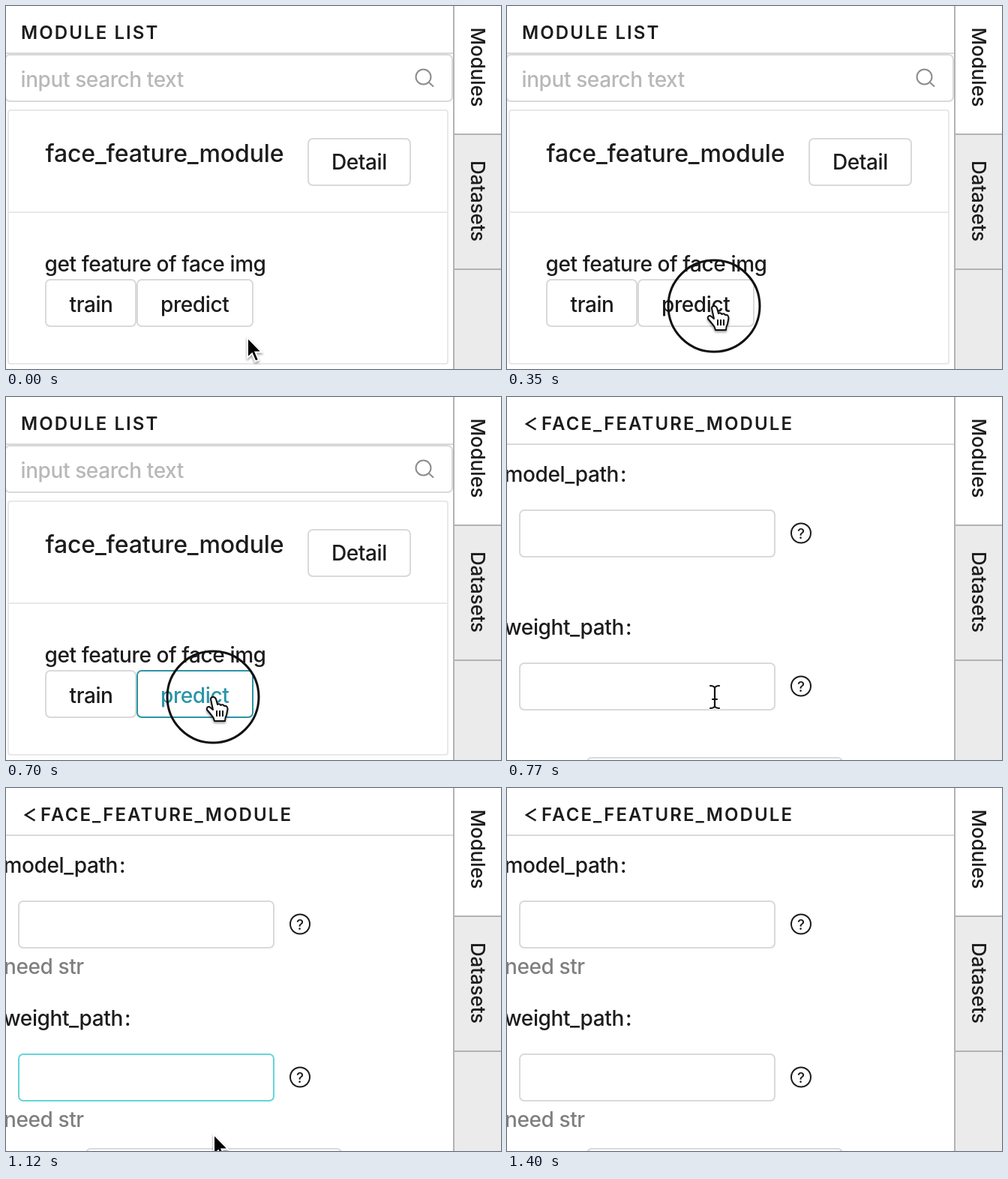
Recreate the animation shown at these times as an HTML page. Size 660x484 px, loop 1610 ms.

```html
<!DOCTYPE html>
<html lang="en">
<head>
<meta charset="utf-8">
<title>Module list</title>
<style>
  html, body { margin: 0; width: 100%; height: 100%; overflow: hidden; background: #fff; }
  svg { display: block; width: 660px; height: 484px; }
  text { font: 450 28px Inter, "Noto Sans", sans-serif; letter-spacing: -.4px; fill: #1c1c1c; white-space: pre; }
  .title { font-size: 24px; font-weight: 600; letter-spacing: 2.1px; }
  .name { font-size: 32px; font-weight: 500; letter-spacing: -.15px; }
  .tab { font-size: 26px; letter-spacing: -.15px; }
  .mark { font-size: 19px; text-anchor: middle; letter-spacing: 0; }
  .hint { fill: #b8b8b8; }
  .help text { fill: #7f7f7f; }
  .box, .rule { fill: none; stroke: #d9d9d9; stroke-width: 2; }
  .card { stroke: #e8e8e8; }
  .edge { stroke: #b3b3b3; }
  .icon { fill: none; stroke: #1c1c1c; stroke-width: 2; }
  .pointer { filter: drop-shadow(0 2px 1.5px #0006); }
</style>
</head>
<body>
<svg viewBox="0 0 660 484">
  <defs>
    <path id="beamShape" d="M-6 -15Q-1 -15 0 -12Q1 -15 6 -15M0 -12V12M-6 15Q-1 15 0 12Q1 15 6 15M-3 3H3"/>
  </defs>

  <g id="list">
    <text class="title" x="20" y="44">MODULE LIST</text>
    <rect class="box" x="-1" y="65" width="596" height="62" rx="6"/>
    <text class="hint" x="19.5" y="108">input search text</text>
    <g class="icon" style="stroke:#8c8c8c"><circle cx="556.5" cy="94.5" r="10"/><path d="M564 102l6 5.5"/></g>
    <rect class="box card" x="3" y="139" width="586" height="338" rx="3"/>
    <path class="rule card" d="M3 275H589"/>
    <text class="name" x="52.500" y="208">face_feature_module</text>
    <rect class="box" x="403" y="177" width="136" height="62" rx="6"/>
    <text x="434" y="218">Detail</text>
    <text x="51.5" y="354">get feature of face img</text>
    <rect class="box" x="53" y="365" width="120" height="62" rx="6"/>
    <text x="84.5" y="408">train</text>
    <rect class="box" id="predictBox" x="175" y="365" width="154" height="62" rx="6"/>
    <text id="predictText" x="206" y="408">predict</text>
  </g>

  <g id="form">
    <path class="icon" style="stroke-width:2.5" d="M38.5 28L26 36L38.5 43.5"/>
    <text class="title" x="46" y="44">FACE_FEATURE_MODULE</text>
    <text x="-3.5" y="113">model_path</text><text x="151" y="113">:</text>
    <rect class="box" x="17" y="151" width="340" height="62" rx="6"/>
    <text x="-3.5" y="317">weight_path</text><text x="158" y="317">:</text>
    <rect class="box" id="weightBox" x="17" y="355" width="340" height="62" rx="6"/>
    <g id="mark"><circle class="icon" cx="392" cy="181.5" r="13"/><text class="mark" x="392" y="188.5">?</text></g>
    <use href="#mark" y="204"/>
    <g class="help" id="help"><text x="-3" y="248">need str</text><text x="-3" y="452">need str</text></g>
    <rect class="box" x="107" y="481" width="340" height="62" rx="6"/>
  </g>

  <path class="rule" d="M0 63H597"/>
  <path fill="#ebebeb" d="M597 171h63v313h-63z"/>
  <path class="rule edge" d="M597 0V484M597 171H660M597 351H660"/>
  <text class="tab" transform="translate(619.5 28.5) rotate(90)">Modules</text>
  <text class="tab" transform="translate(619.5 206) rotate(90)">Datasets</text>

  <circle id="ring" cx="276" cy="400" r="61" fill="none" stroke="#111" stroke-width="3"/>
  <g id="cursor">
    <path id="arrow" class="pointer" stroke="#fff" stroke-width="2" d="M0 0V27L6 21.5L10.5 32L15 30L10.5 19.5H19Z"/>
    <g id="hand" class="pointer" stroke="#111" stroke-width="2" stroke-linejoin="round">
      <path fill="#fff" d="M-3 3Q-3 0 0 0Q3 0 4 3L6 10Q8 8 10.5 11Q13 9 15 12Q19 11 19.5 16L18 24Q16 27 16 32H2Q1 27 -3 23L-8 17Q-9 13 -5 13L0 17Z"/>
      <path d="M5 18v8M9 18v8M13 18v8"/>
    </g>
    <g id="beam" fill="none" stroke-linecap="round">
      <use href="#beamShape" stroke="#fff" stroke-width="4.5"/>
      <use href="#beamShape" stroke="#111" stroke-width="2.2"/>
    </g>
  </g>
</svg>
<script>
const LOOP = 1610, STEP = 70;
const GREY = [217, 217, 217], INK = [28, 28, 28], TEAL = [43, 149, 168], CYAN = [100, 213, 218];
const $ = id => document.getElementById(id);
const progress = (t, from, to) => Math.min(1, Math.max(0, (t - from) / (to - from)));
const mix = (a, b, p) => a + (b - a) * p;
const blend = (a, b, p) => `rgb(${a.map((v, i) => Math.round(mix(v, b[i], p)))})`;
const show = (id, on) => $(id).style.display = on ? '' : 'none';

function draw(t) {
  const onForm = t >= 770;
  show('list', !onForm);
  show('form', onForm);
  show('ring', t >= 350 && !onForm);

  const pressed = progress(t, 350, 490);
  $('predictBox').style.stroke = blend(GREY, TEAL, pressed);
  $('predictText').style.fill = blend(INK, TEAL, pressed);

  const helpIn = progress(t, 770, 910);
  $('help').style.opacity = helpIn;
  $('help').setAttribute('transform', `translate(0 ${mix(-5, 0, helpIn)})`);
  const focus = helpIn * (1 - progress(t, 1190, 1400));
  $('weightBox').style.stroke = blend(GREY, CYAN, focus);

  // Glide to the button, then leave through the bottom edge.
  const arrive = 1 - (1 - progress(t, 0, 280)) ** 2;
  const leave = progress(t, 910, 1190) ** 2;
  const x = mix(322, 276, arrive) + (onForm ? 1 : 0);
  const y = mix(442, 400, arrive) + leave * 110;
  const overBox = y < 428;
  $('cursor').setAttribute('transform', `translate(${x} ${y})`);
  show('cursor', t < 1190);
  show('arrow', !overBox);
  show('hand', overBox && !onForm);
  show('beam', overBox && onForm);
}

function tick() {
  draw(Math.floor(performance.now() % LOOP / STEP) * STEP);
  requestAnimationFrame(tick);
}
tick();
</script>
</body>
</html>
```
